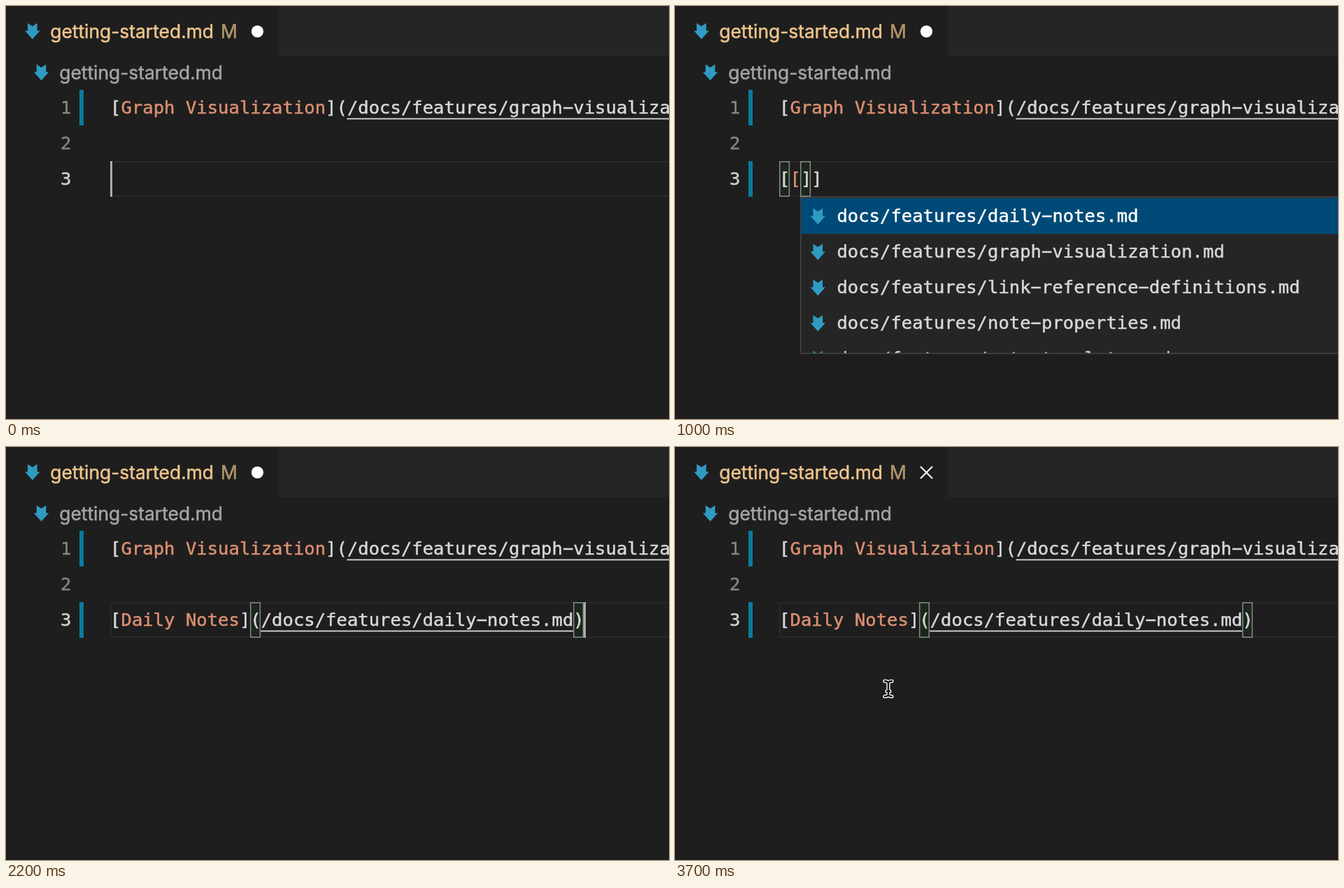
An HTML page with a canvas for the animation above (3800 ms loop, 948 by 591 pixels).

```html
<!DOCTYPE html>
<html lang="en">
<head>
<meta charset="utf-8">
<title>Wiki link completion</title>
<style>
html, body { margin: 0; width: 100%; height: 100%; overflow: hidden; background: #1e1e1e; }
canvas { display: block; width: 948px; height: 591px; }
</style>
</head>
<body>
<canvas id="stage" width="948" height="591"></canvas>
<script>
const ctx = document.getElementById('stage').getContext('2d');
const W = 948, H = 591, LOOP = 3800, TICK = 100;
const MONO = '25.58px "DejaVu Sans Mono", monospace';
const SANS = '26.4px Inter, sans-serif';
const LEFT = 148.6, PITCH = 15.4, TOP = 120, LINE = 51;
const COLOR = {
  bg: '#1e1e1e', panel: '#252526', text: '#d8d8d8', link: '#dc8f71', dim: '#858585',
  icon: '#2f9bc1', gutter: '#0b7b9d', lineEdge: '#292929', caret: '#aeafad',
  selected: '#004a77', edge: '#454545', tab: '#f0c58c', status: '#b2966a', crumb: '#a5a5a5'
};
const FILES = ['daily-notes', 'graph-visualization', 'link-reference-definitions',
  'note-properties', 'note-templates'];

const colX = col => LEFT + col * PITCH;
const lineY = line => TOP + (line - 1) * LINE;

function rect(x, y, w, h, color) {
  ctx.fillStyle = color;
  ctx.fillRect(x, y, w, h);
}

// A hairline outline gives the heavier smoothing of the editor's text.
function label(str, x, y, color, font) {
  ctx.font = font;
  ctx.fillStyle = ctx.strokeStyle = color;
  ctx.lineWidth = 0.5;
  ctx.lineJoin = 'round';
  ctx.fillText(str, x, y);
  ctx.strokeText(str, x, y);
}

// The minus glyph gives the wide hyphen of the editor font.
function mono(str, x, y, color) {
  label(str.replace(/-/g, '\u2212'), x, y, color, MONO);
}

function code(str, line, col, color = COLOR.text) {
  mono(str, colX(col) + 0.5, lineY(line) + 34, color);
}

function polyline(points) {
  ctx.beginPath();
  points.forEach(([x, y]) => ctx.lineTo(x, y));
}

function fileIcon(x, y) {
  ctx.save();
  ctx.translate(x, y);
  polyline([[-6.8, -11.5], [0, -7], [6.8, -11.5], [6.8, -0.5],
    [10.7, -0.5], [0, 11.5], [-10.7, -0.5], [-6.8, -0.5]]);
  ctx.fillStyle = COLOR.icon;
  ctx.fill();
  ctx.restore();
}

function header(saved) {
  rect(390, 0, W - 390, 72, COLOR.panel);
  fileIcon(37.8, 36);
  label('getting-started.md', 63.2, 45.5, COLOR.tab, SANS);
  label('M', 307, 45.5, COLOR.status, SANS);
  if (saved) {
    ctx.strokeStyle = '#fff';
    ctx.lineWidth = 2.2;
    polyline([[351, 28], [368, 45]]);
    ctx.stroke();
    polyline([[368, 28], [351, 45]]);
    ctx.stroke();
  } else {
    ctx.fillStyle = '#fff';
    ctx.beginPath();
    ctx.arc(359.5, 36.3, 8.6, 0, Math.PI * 2);
    ctx.fill();
  }
  fileIcon(50.5, 95);
  label('getting-started.md', 76.2, 104.5, COLOR.crumb, SANS);
}

function gutter(line, changed) {
  mono(String(line), 78, lineY(line) + 34, line === 3 ? '#d0d0d0' : COLOR.dim);
  if (changed) rect(105, lineY(line), 6, LINE, COLOR.gutter);
}

function markdownLink(line, title, path) {
  const start = title.length + 3;
  code('[', line, 0);
  code(title, line, 1, COLOR.link);
  code('](', line, title.length + 1);
  code(path, line, start);
  code(')', line, start + path.length);
  rect(colX(start), lineY(line) + 40.5, path.length * PITCH, 1.8, COLOR.text);
}

function bracketBox(col) {
  const x = Math.round(colX(col)) + 0.75, y = lineY(3) + 0.75;
  ctx.fillStyle = 'rgba(0,100,0,0.13)';
  ctx.fillRect(x, y, 13.6, 49.5);
  ctx.strokeStyle = '#888';
  ctx.lineWidth = 1.5;
  ctx.lineJoin = 'miter';
  ctx.strokeRect(x, y, 13.6, 49.5);
}

function suggestions() {
  const x = 179, y = 273;
  rect(x, y, W - x, 225, COLOR.edge);
  rect(x + 1.5, y + 1.5, W - x, 222, COLOR.panel);
  ctx.save();
  ctx.beginPath();
  ctx.rect(x + 1.5, y + 1.5, W - x, 222);
  ctx.clip();
  FILES.forEach((name, i) => {
    const top = y + 2 + i * LINE;
    if (i === 0) rect(x, top, W - x, LINE, COLOR.selected);
    fileIcon(204.3, top + 26);
    mono(`docs/features/${name}.md`, 231.4, top + 34, i === 0 ? '#fff' : COLOR.text);
  });
  ctx.restore();
}

function pointer(t) {
  const u = (t - 3000) / 700;
  ctx.save();
  ctx.translate(238 + 67 * u ** 2.2, 246 + 100 * u ** 4);
  ctx.beginPath();
  for (const s of [-1, 1]) {
    ctx.moveTo(-5, 11 * s);
    ctx.quadraticCurveTo(0, 11 * s, 0, 7.5 * s);
    ctx.quadraticCurveTo(0, 11 * s, 5, 11 * s);
  }
  ctx.moveTo(0, -8);
  ctx.lineTo(0, 8);
  ctx.moveTo(-2, 3.5);
  ctx.lineTo(2, 3.5);
  ctx.lineCap = 'round';
  for (const [width, color] of [[5.2, '#fff'], [2.4, '#111']]) {
    ctx.lineWidth = width;
    ctx.strokeStyle = color;
    ctx.stroke();
  }
  ctx.restore();
}

function editState(t) {
  if (t < 200) return { caret: 0, boxes: [], caretOn: true };
  if (t < 400) return { caret: 1, boxes: [0, 1], caretOn: true };
  if (t < 1200) return { caret: 2, boxes: [0, 2], caretOn: t < 900 };
  return { caret: 44, boxes: [13, 43], caretOn: (t - 1200) % 1000 < 500 };
}

function draw(t) {
  const { caret, boxes, caretOn } = editState(t);
  rect(0, 0, W, H, COLOR.bg);
  header(t >= 3300);
  gutter(1, true);
  gutter(2, false);
  gutter(3, t >= 800);

  ctx.strokeStyle = COLOR.lineEdge;
  ctx.lineWidth = 2;
  ctx.strokeRect(150, lineY(3) + 1, W, LINE - 2);
  boxes.forEach(bracketBox);

  markdownLink(1, 'Graph Visualization', '/docs/features/graph-visualization.md');
  if (t >= 1200) {
    markdownLink(3, 'Daily Notes', '/docs/features/daily-notes.md');
  } else if (t >= 400) {
    code('[', 3, 0);
    code('[', 3, 1, COLOR.link);
    code(']]', 3, 2);
  } else if (t >= 200) {
    code('[]', 3, 0);
  }

  if (caretOn) rect(Math.floor(colX(caret) + 0.4), lineY(3), 3, LINE, COLOR.caret);
  if (t >= 600 && t < 1200) suggestions();
  if (t >= 3000) pointer(t);
}

const begin = performance.now();
function frame() {
  const t = (performance.now() - begin) % LOOP;
  draw(Math.floor(t / TICK) * TICK);
  requestAnimationFrame(frame);
}
frame();
</script>
</body>
</html>
```
